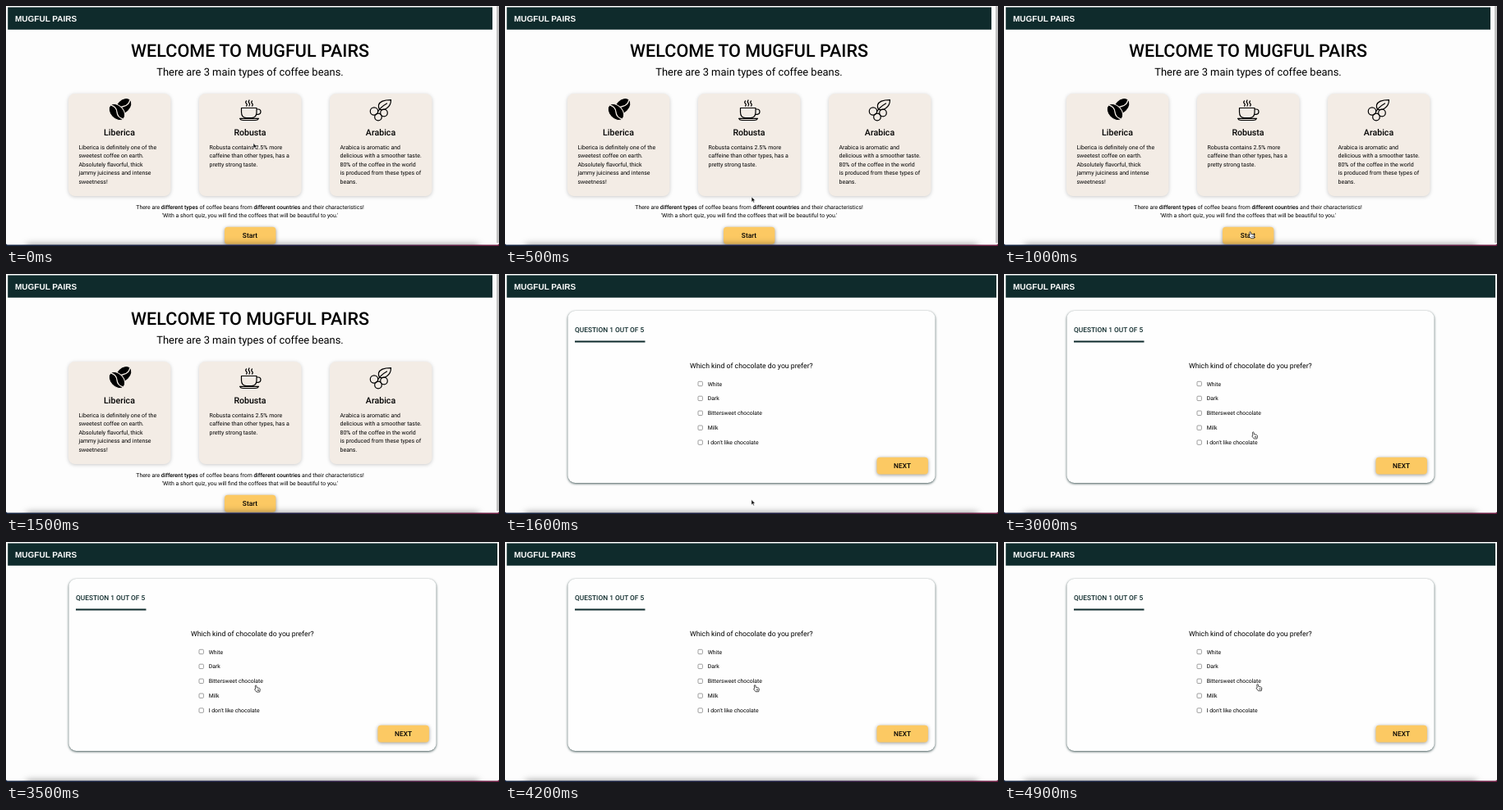
Animation of 600x293 px, one loop 5000 ms. Source, as an HTML page:

```html
<!DOCTYPE html>
<html lang="en">
<head>
<meta charset="utf-8">
<title>Mugful Pairs</title>
<style>
  html, body { margin: 0; width: 100%; height: 100%; overflow: hidden; background: #fdfdfd; }
  svg { display: block; width: 600px; height: 293px; }
  text { font: 7px Roboto, sans-serif; text-rendering: geometricPrecision; fill: #000; }
  .mid { text-anchor: middle; }
  .bold, tspan { font-weight: 500; }
  .line { fill: none; stroke: #000; stroke-width: 1.2; stroke-linecap: round; stroke-linejoin: round; }
  .crease { fill: none; stroke: #f3ece5; stroke-width: 1.3; }
  .card { fill: #f3ece5; filter: drop-shadow(0 1px 2px #0003); }
  .button { fill: #fcc963; filter: drop-shadow(0 1px 2px #0006); }
  .panel { fill: #fefefe; filter: drop-shadow(0 1.5px 1.5px #0f2b2bcc); }
  #shade { fill: #0006; filter: blur(4px); }
</style>
</head>
<body>
<svg viewBox="0 0 600 293">
  <defs>
    <linearGradient id="edge">
      <stop stop-color="#14233f"/><stop offset=".6" stop-color="#1d1a40"/><stop offset="1" stop-color="#6d1c42"/>
    </linearGradient>
  </defs>
  <rect width="600" height="293" fill="#fdfdfd"/>
  <rect id="nav" x="2.2" y="1.5" height="27.3" fill="#0f2b2c"/>
  <text x="11" y="19" style="font:bold 10px 'Liberation Sans',Arial,sans-serif;fill:#fff">MUGFUL PAIRS</text>

  <g id="home">
    <text class="mid bold" x="297" y="61.8" style="font-size:21.6px">WELCOME TO MUGFUL PAIRS</text>
    <text class="mid" x="297" y="84.5" style="font-size:12.95px">There are 3 main types of coffee beans.</text>
    <g id="cards"></g>
    <g transform="rotate(-45 143 122.500)">
      <ellipse cx="143" cy="122.500" rx="11" ry="7.500"/>
      <path class="crease" d="M132 122.500q5.500-4 11 0t11 0"/>
    </g>
    <g transform="rotate(48 135 129.500)">
      <ellipse cx="135" cy="129.500" rx="11.500" ry="8" stroke="#f3ece5"/>
      <path class="crease" d="M123.500 129.500q6-4 11.500 0t11.500 0"/>
    </g>
    <path class="line" d="M286.500 124.500h18.500v5q0 7-6 7h-6.500q-6 0-6-7zM305 126h2q3 0 3 3t-3 3.300h-2.500M284.500 137.300q1 2.200 4 2.200h15q3 0 4-2.200zM292.500 116q-1.500 1.500 0 3t0 3M296 115q-1.500 1.700 0 3.500t0 3.500M299.500 116q-1.500 1.500 0 3t0 3"/>
    <g class="line">
      <circle cx="448" cy="128.500" r="4.700"/><circle cx="460" cy="130.500" r="4.300"/><circle cx="453" cy="135.500" r="4.300"/>
      <path d="M468.500 114.700q-13 0-15 6-.5 3 1 5.500 5 1.500 9-1.500 5-3.500 5-10zM452.500 129q4-6 11-10"/>
    </g>
    <text class="mid" x="297" y="247.700" style="font-size:6.9px">There are <tspan>different types</tspan> of coffee beans from <tspan>different countries</tspan> and their characteristics!</text>
    <text class="mid" x="297" y="258" style="font-size:6.9px">'With a short quiz, you will find the coffees that will be beautiful to you.'</text>
    <rect class="button" x="266" y="269.700" width="62.400" height="21" rx="4"/>
    <text class="mid bold" x="297" y="283" style="font-size:8.400px">Start</text>
    <rect x="597" width="3" height="289.500" rx="1.200" fill="#c3c3c3"/>
  </g>

  <g id="quiz">
    <rect class="panel" x="76.500" y="45" width="447" height="210" rx="9"/>
    <text class="bold" x="85" y="70.500" style="font-size:8.350px;fill:#0f2b2c">QUESTION 1 OUT OF 5</text>
    <rect x="85" y="81.500" width="85.500" height="2" fill="#0f2b2c"/>
    <text x="225" y="115.300" style="font-size:8.700px">Which kind of chocolate do you prefer?</text>
    <g id="options"></g>
    <rect class="button" x="452.500" y="223.700" width="62.400" height="20.700" rx="4"/>
    <text class="mid bold" x="483.500" y="237" style="font-size:8.300px">NEXT</text>
  </g>

  <rect id="shade" x="25" y="291" width="550" height="8"/>
  <path d="M0 289.500q0 2 3 2H597q3 0 3-2V293H0z" fill="url(#edge)"/>
  <g id="pointer" stroke-linejoin="round">
    <path id="arrow" d="M0 0V6.300L1.500 5 2.500 7.200 3.500 6.700 2.600 4.600H4.500z" fill="#111" stroke="#fff" stroke-width=".5"/>
    <path id="hand" d="M-.7.500Q0-.6.800.500L1.400 3 4.300 3.500Q5.400 4 5.300 5.500L4.700 8.200H1L-1.300 5.300Q-1.500 4.300-.4 4.500zM2.300 5.200v1.600M3.600 5.200v1.600" fill="#fff" stroke="#222" stroke-width=".8"/>
  </g>
</svg>
<script>
const $ = id => document.getElementById(id);
const cards = [
  ["Liberica", "Liberica is definitely one of the", "sweetest coffee on earth.", "Absolutely flavorful, thick", "jammy juiciness and intense", "sweetness!"],
  ["Robusta", "Robusta contains 2.5% more", "caffeine than other types, has a", "pretty strong taste."],
  ["Arabica", "Arabica is aromatic and", "delicious with a smoother taste.", "80% of the coffee in the world", "is produced from these types of", "beans."]
];
$("cards").innerHTML = cards.map(([name, ...lines], i) => {
  const x = 76 + 159 * i;
  return `<rect class="card" x="${x}" y="107" width="124.5" height="125" rx="8"/>
    <text class="mid bold" x="${x + 62}" y="158.3" style="font-size:10.6px">${name}</text>` +
    lines.map((s, j) => `<text x="${x + 12.5}" y="${175 + 10.45 * j}">${s}</text>`).join("");
}).join("");

$("options").innerHTML = ["White", "Dark", "Bittersweet chocolate", "Milk", "I don't like chocolate"].map((s, i) => {
  const y = 134 + 17.9 * i;
  return `<rect x="235" y="${y - 2.7}" width="5.4" height="5.4" rx="1" fill="#fff" stroke="#777" stroke-width=".7"/>
    <text x="246.7" y="${y + 2.5}" style="font-size:6.85px">${s}</text>`;
}).join("");

// time, x, y of the pointer
const path = [[0, 301, 167.5], [100, 301, 167.5], [800, 299.5, 275.5], [1900, 300, 275.5], [2500, 300, 265],
  [3200, 304, 175], [4300, 304, 174.5], [4900, 308.5, 173.5], [5000, 308.5, 173.5]];

function pointerAt(t) {
  const i = path.findIndex(p => p[0] > t);
  const [t0, x0, y0] = path[i - 1], [t1, x1, y1] = path[i];
  const u = (t - t0) / (t1 - t0), k = u * u * (3 - 2 * u);
  return [x0 + (x1 - x0) * k, y0 + (y1 - y0) * k];
}

const show = (id, on) => $(id).setAttribute("visibility", on ? "visible" : "hidden");

function draw(now) {
  const t = Math.floor(now % 5000 / 100) * 100;
  const home = t < 1600, shown = t < 1400 || !home;
  const [x, y] = pointerAt(t);
  const onOption = y > 128 && y < 211 && (y - 128.5) % 17.9 < 11;
  const hover = home ? y > 269 : onOption;
  show("home", home);
  show("quiz", !home);
  show("arrow", shown && !hover);
  show("hand", shown && hover);
  $("nav").setAttribute("width", home ? 589.8 : 595.8);
  $("pointer").setAttribute("transform", `translate(${x} ${y})`);
}

const start = performance.now();
function tick() {
  draw(performance.now() - start);
  requestAnimationFrame(tick);
}
tick();
</script>
</body>
</html>
```
